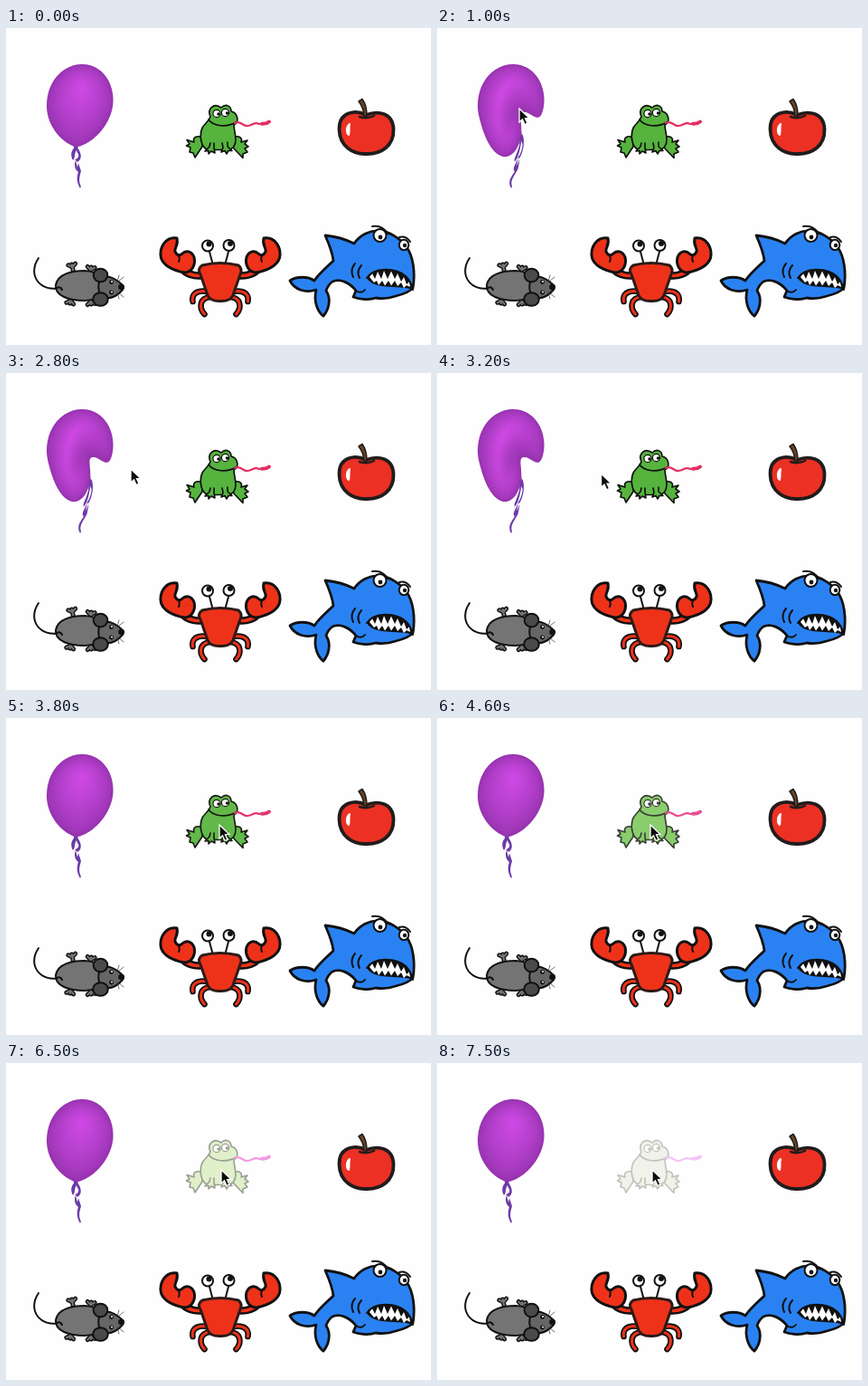
Recreate the animation shown at these times as an HTML page. Size 470 by 350 pixels, loop 8 s.

```html
<!DOCTYPE html>
<html lang="en">
<head>
<meta charset="utf-8">
<title>Six animals and things</title>
<style>
  html, body { margin: 0; width: 100%; height: 100%; overflow: hidden; background: #fefefe; }
  svg { display: block; width: 470px; height: 350px; stroke-width: 2; }
  g { stroke-linejoin: round; stroke-linecap: round; }
  .ink { stroke: #111; }
  .line { fill: none; }
  .red { fill: #ee3219; }
  .blue { fill: #2a82f2; }
  .white { fill: #fff; }
  .black { fill: #111; stroke: none; }
  .grey { fill: #747474; }
  .dark { fill: #4a4a4a; }
  #frog { stroke: var(--edge); stroke-width: 1.6; fill: var(--skin); }
  #frog .white { fill: #fff; stroke-width: 1.2; }
  #frog .pupil { fill: var(--edge); stroke: none; }
  #frog .tongue { fill: none; stroke: var(--tongue); }
</style>
</head>
<body>
<svg viewBox="0 0 470 350">
  <defs>
    <path id="toes" d="M0 6 L0 -1 M0 2 L-4 -1 M0 2 L4 -1"/>
    <g id="paw" class="line">
      <use href="#toes" stroke="#111" stroke-width="5"/>
      <use href="#toes" stroke="#747474" stroke-width="2.200"/>
    </g>
    <path id="shins" d="M222 291 C211 289 205 294 206.500 302 M226 297 C214 298 213 309 219.500 316"/>
    <g id="claw">
      <path class="ink red" stroke-width="2.600" d="M199 264 C204 270 211 272 219 269 L219 276 C207 278 197 274 192 267 Z"/>
      <path class="ink red" stroke-width="3" d="M189 232 C176 230 169 243 171.500 254 C175 264 187 268 197 270 C206 270 210 261 208 253 C205 246 199 245 195 249 C192 252 189 251 187 247 C186 242 191 240 189 232 Z"/>
      <path class="ink line" d="M190 250 Q193 254 191 258"/>
      <g class="line">
        <use href="#shins" stroke="#111" stroke-width="6.600"/>
        <use href="#shins" stroke="#ee3219" stroke-width="3"/>
      </g>
    </g>
  </defs>

  <g id="balloon"></g>

  <g id="frog">
    <path d="M217 121 C211 118 206 121 208 126 L200 123.500 L203 128 L199.500 130 L204 132 L203 137 L207 138 L209 143 L217 131 Z"/>
    <path d="M251 121 C257 118 262 121 260 126 L267 124 L264 128 L268 131 L264 133 L267 137 L262 139 L262 143.500 L251 132 Z"/>
    <path d="M226 98 C222 89 230 82 238 88 C243 83 249 86 249 92 C257 94 258 104 252 107 C252 112 254 117 254 123 C254 131 250 134 245 134.500 L224 134.500 C216 133 214 121 216 113 C218 105 223 106 226 98 Z"/>
    <path d="M226 127 L225 131 L220 136 L224 135.500 L224 139 L227 136 L231 138 L230 132 L230 127"/>
    <path d="M239 127 L240 132 L238 137 L242 135.500 L244 139 L246 135.500 L250 135.500 L245 131 L245 126"/>
    <path class="line" d="M224 101 C229 109 245 110 254 104"/>
    <circle class="white" cx="233" cy="94.500" r="4.100"/>
    <circle class="white" cx="242.500" cy="93.500" r="4.100"/>
    <circle class="pupil" cx="235" cy="95" r="1.700"/>
    <circle class="pupil" cx="244.500" cy="94" r="1.700"/>
    <path class="tongue" stroke-width="2.200" d="M253 105 C259 101 262 109 267 108 C273 108 274 103 280 106 L287 105"/>
    <path class="tongue" stroke-width="4" d="M283 105.800 Q288 106 291 103.500"/>
  </g>

  <g>
    <path d="M398 96 C387 90 368 92 368.500 112 C369 131 384 139.500 398 139 C415 139.500 429 130 428.500 112 C428 93 411 91 398 96 Z" fill="#ed3024" stroke="#211d1c" stroke-width="3.800"/>
    <path class="line" d="M391 98 Q399 101 407 97" stroke="#211d1c" stroke-width="2.500"/>
    <path d="M390 81 L394 78.500 C398 84 399 90 399 97 L395.500 97 C396 90 394 86 390 81 Z" fill="#6b4521" stroke="#211d1c" stroke-width="1.600"/>
    <path d="M380 106 C376 109 376 116 379 118 C380 114 379 110 380 106 Z" fill="#fff" stroke="#fff"/>
  </g>

  <g>
    <path class="ink line" d="M60 287 C38 292 23 273 36 254"/>
    <use href="#paw" transform="translate(73 262) rotate(-12)"/>
    <use href="#paw" transform="translate(94 265) rotate(8)"/>
    <use href="#paw" transform="translate(71 303) rotate(192)"/>
    <use href="#paw" transform="translate(94 304) rotate(172)"/>
    <path class="ink grey" d="M55 284 C57 271 74 268 87 268 C103 269 111 277 111 286 C110 295 102 300 87 301 C70 301 54 296 55 284 Z"/>
    <path class="ink line" d="M56 287 Q60 285 62 289"/>
    <path class="ink" fill="#666" d="M106 275 C115 273 123 278 129 284 Q131 286 129 289 C122 297 114 300 106 297 C101 290 101 281 106 275 Z"/>
    <ellipse class="ink dark" cx="104.500" cy="273" rx="7.800" ry="7.300"/>
    <ellipse class="ink dark" cx="104.500" cy="299.500" rx="8.300" ry="7.300"/>
    <g class="black">
      <circle cx="127.500" cy="286" r="3.300"/>
      <circle cx="116.500" cy="280.500" r="2.400"/>
      <circle cx="116.500" cy="292" r="2.400"/>
    </g>
    <circle class="white" cx="117" cy="280" r="1"/>
    <circle class="white" cx="117" cy="291.500" r="1"/>
    <path class="line" stroke="#333" stroke-width=".7" d="M123 280 L125 273 M124 280 L130 275 M123 292 L125 299 M124 292 L130 297"/>
  </g>

  <g>
    <path class="ink line" d="M229 262 L225 247 M242 262 L246 247"/>
    <use href="#claw"/>
    <use href="#claw" transform="matrix(-1 0 0 1 474 0)"/>
    <path class="red" stroke="#2b1a17" stroke-width="3" d="M217 262 Q237 257 257 262 Q262 266 259 272 L251 295 Q248 302 237 301.500 Q226 302 223 295 L215 272 Q211 266 217 262 Z"/>
    <circle class="ink white" cx="223" cy="240.500" r="6"/>
    <circle class="ink white" cx="246.500" cy="240" r="6"/>
    <circle class="black" cx="224.500" cy="238.500" r="3"/>
    <circle class="black" cx="248" cy="238" r="3"/>
  </g>

  <g>
    <path class="ink blue" stroke-width="2.800" d="M353 229 C364 230 375 233 385 238 C391 229 402 223 413 224 C424 225 436 232 443 242 C450 251 453 270 450 287 C446 292 439 294 431 296 C422 299 415 299 409 298 C400 301 389 299 384 297 L387 290 C380 281 369 276 361 280 C357 283 355 287 354 290 C360 299 357 311 351 318 C344 313 340 301 343 289 C331 293 319 289 314 279 C321 274 334 274 341 279 C347 270 355 264 362 257 C361 247 357 238 353 229 Z"/>
    <path class="ink line" d="M387 290 Q393 294 397 289 M386 260 Q380 267 384 275 M393 262 Q387 269 391 276"/>
    <path class="black" d="M399 276 C406 264 431 264 442 274 Q448 280 450 289 C433 283 407 290 399 276 Z"/>
    <path class="white" d="M402 275 L405 271 L408 277 L411 269 L415 277 L418 268 L422 277 L426 268.500 L430 277 L433 271 L437 280 L440 275 L443 283 L446 280 L447 286 L443 284 L440 287 L437 281 L433 285 L430 279 L426 284.500 L423 279 L419 284.500 L416 279 L412 284 L410 279 L407 281 Z"/>
    <path class="ink line" d="M399 276 C406 264 431 264 442 274 Q448 280 450 289"/>
    <ellipse class="ink white" cx="413.500" cy="229" rx="7" ry="7"/>
    <ellipse class="ink white" cx="440" cy="239.500" rx="5.300" ry="5.700"/>
    <circle class="black" cx="414" cy="231" r="2.400"/>
    <circle class="black" cx="441" cy="240" r="2.200"/>
    <path class="ink line" d="M405 219 Q416 217 422 227 M435 231 Q442 229 447 236"/>
  </g>

  <path id="cursor" d="M0 0 L0 15 L3.500 11.800 L6 17.500 L9 16.200 L6.500 10.700 L11 10.500 Z" fill="#0c0c0c" stroke="#fff" stroke-width="1.300"/>
</svg>

<script>
const NS = 'http://www.w3.org/2000/svg';
const LOOP = 8000;
const $ = id => document.getElementById(id);
const mix = (a, b, k) => a + (b - a) * k;
const rgb = c => `rgb(${c.map(Math.round)})`;
const mixRgb = (a, b, k) => a.map((v, i) => mix(v, b[i], k));

// Piecewise linear value from [time, value...] rows
function track(rows, t) {
  if (t <= rows[0][0]) return rows[0].slice(1);
  for (let i = 1; i < rows.length; i++) {
    const [a, b] = [rows[i - 1], rows[i]];
    if (t <= b[0]) {
      const k = (t - a[0]) / (b[0] - a[0]);
      return a.slice(1).map((v, j) => mix(v, b[j + 1], k));
    }
  }
  return rows[rows.length - 1].slice(1);
}

function sample(d, n) {
  const path = document.createElementNS(NS, 'path');
  path.setAttribute('d', d);
  const len = path.getTotalLength();
  return Array.from({ length: n }, (_, i) => {
    const p = path.getPointAtLength(len * i / n);
    return [p.x, p.y];
  });
}

// Swirl around the balloon's centre, strongest in the middle
function whirl([x, y], angle) {
  const u = (x - 81.5) / 36.5, v = (y - 108.5) / 68.5;
  const f = Math.max(0, 1 - Math.hypot(u, v));
  const a = angle * f * f, c = Math.cos(a), s = Math.sin(a);
  return [81.5 + 36.5 * (u * c + v * s), 108.5 + 68.5 * (v * c - u * s)];
}

const skin = sample('M84 40 C104 40 118.500 57 118.500 80 C118.500 103 99 126 80 131 L75.500 131 C60 125 45 107 45 86 C45 58 64 40 84 40 Z', 160);
const ribbon = [
  'M75 129 L80 129 L79 134 L75 134 Z',
  'M76 132 C72 135 71 141 74 146 C77 143 75 139 78 135 L79 138 C82 141 79 145 76 145 L79 148 C84 145 84 139 79 132 Z',
  'M77 146 C75 151 76 156 80 159 C78 165 78 170 82 177 L83 175 C80 169 81 165 83 158 L80 149 L79 154 L78 150 Z'
].map(d => sample(d, 70));

const parts = [];
function addPart(points, fill) {
  const el = document.createElementNS(NS, 'path');
  el.setAttribute('fill', fill);
  $('balloon').append(el);
  parts.push({ el, points });
}
ribbon.forEach(points => addPart(points, '#6b3aa6'));
const LAYERS = 16;
for (let i = 0; i < LAYERS; i++) {
  const k = i / LAYERS, size = 1 - k;
  const points = skin.map(([x, y]) => [mix(84, x, size), mix(64, y, size)]);
  addPart(points, rgb(mixRgb([152, 52, 176], [208, 74, 230], Math.pow(k, 0.7))));
}

let lastTwist = null;
function drawBalloon(twist) {
  if (twist === lastTwist) return;
  lastTwist = twist;
  for (const { el, points } of parts) {
    const out = points.map(p => whirl(p, twist).map(v => v.toFixed(2)).join(' '));
    el.setAttribute('d', 'M' + out.join('L') + 'Z');
  }
}

const cursorPath = [[1800, 91, 89], [2100, 122, 98], [2800, 138, 106], [3700, 236, 118], [5000, 236, 118], [5400, 238, 118]];
const fade = [[3600, 0], [4000, 0.2], [4200, 0.2], [5000, 0.65], [5400, 0.7], [5700, 1], [5900, 1], [6200, 1.35], [6400, 1.4], [7000, 1.94], [7400, 1.97], [7500, 2]];
const frogColors = {
  '--skin': [[86, 179, 62], [206, 239, 172], [241, 242, 234]],
  '--edge': [[12, 14, 10], [118, 126, 110], [194, 194, 187]],
  '--tongue': [[228, 46, 100], [242, 116, 206], [245, 196, 246]]
};

function draw(time) {
  const t = Math.floor(time % LOOP / 100) * 100;
  const turn = t < 3300 ? Math.min(1, t / 1000) : 0;
  drawBalloon(turn * 190 * Math.PI / 180);

  const [x, y] = track(cursorPath, t);
  $('cursor').setAttribute('transform', `translate(${x} ${y})`);
  $('cursor').style.display = t < 100 ? 'none' : '';

  const [pale] = track(fade, t);
  const i = Math.min(1, Math.floor(pale));
  for (const [name, stops] of Object.entries(frogColors))
    $('frog').style.setProperty(name, rgb(mixRgb(stops[i], stops[i + 1], pale - i)));
}

const start = performance.now();
function tick() {
  draw(performance.now() - start);
  requestAnimationFrame(tick);
}
tick();
</script>
</body>
</html>
```
